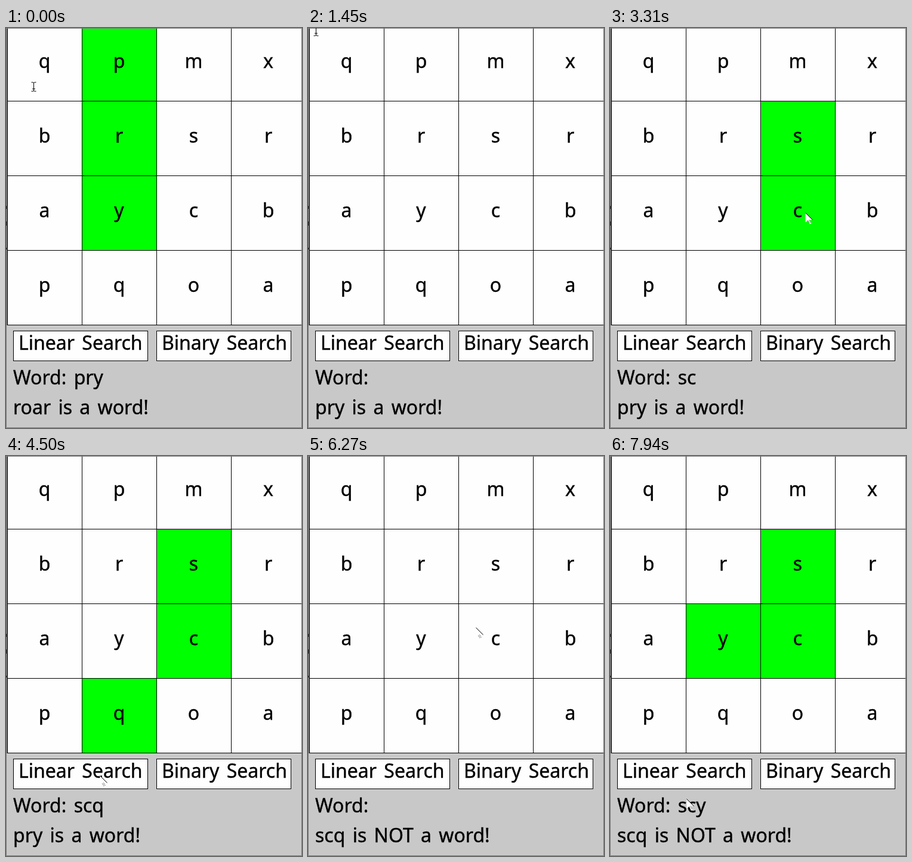
These frames come from a looping animation (496x670 px, 7990 ms). An HTML page:

```html
<!DOCTYPE html>
<html lang="en">
<head>
<meta charset="utf-8">
<title>Word grid search</title>
<style>
  html, body { margin: 0; width: 100%; height: 100%; overflow: hidden; background: #c8c8c8; }
  svg { display: block; }
  text {
    font: 32px "Noto Sans", "Open Sans", sans-serif;
    word-spacing: 4px; white-space: pre; stroke: #000; stroke-width: .4px;
  }
  rect { fill: #fefefe; stroke: #000; }
  .letter { text-anchor: middle; }
  .picked { fill: #0f0; }
  .line { fill: none; stroke: #000; }
  .edge { fill: none; stroke: #777; }
</style>
</head>
<body>
<svg width="496" height="670" viewBox="0 0 496 670">
  <g id="grid"></g>
  <rect x="12.5" y="507.5" width="225" height="50"/>
  <rect x="252.5" y="507.5" width="225" height="50"/>
  <text x="21" y="539">Linear Search</text>
  <text x="261" y="539">Binary Search</text>
  <text id="word" x="12" y="597"></text>
  <text id="status" x="12" y="647"></text>
  <path class="edge" d="M.5.5H495.5V669.5H.5ZM1.5 0V498"/>
  <path class="line" d="M.5 298v5M.5 324v7M.5 368v3"/>
  <g id="beam">
    <path class="line" d="M-4-7.5h3l1 1 1-1h3M-4 7.5h3l1-1 1 1h3M0-7V7M-2.5 3.5h5"/>
  </g>
  <g id="arrow">
    <path d="M0 0V16L4 13 7 19 10 18 7 12H12Z" fill="#fff"/>
    <path class="line" d="M0 0L12 12"/>
    <path class="line" stroke-dasharray="1 1" d="M4 13l3 5M6 12l3 5"/>
  </g>
</svg>
<script>
const LOOP = 7990, MOVE = 410, SIZE = 125;
const LETTERS = "qpmxbrsraycbpqoa";
const DICTIONARY = ["roar", "pry"];
const FIRST_PICK = [1, 5, 9], FIRST_SEARCH = 400;

// Each step moves the arrow, then picks a cell or, without one, runs the search.
const STEPS = [
  { x: 325, y: 181, arrive: 1980, press: 2260, cell: 6 },
  { x: 327, y: 309, arrive: 3100, press: 3200, cell: 10 },
  { x: 199, y: 422, arrive: 3720, press: 3970, cell: 13 },
  { x: 157, y: 535, arrive: 4500, press: 5130 },
  { x: 345, y: 161, arrive: 6430, press: 6620, cell: 6 },
  { x: 330, y: 325, arrive: 7030, press: 7150, cell: 10 },
  { x: 205, y: 335, arrive: 7390, press: 7750, cell: 9 },
  { x: 128, y: 574, arrive: 7940, press: LOOP }
];
const ARROW_START = STEPS[0].arrive - MOVE;

const $ = id => document.getElementById(id);
const clamp = v => Math.min(1, Math.max(0, v));
const ease = u => u * u * (3 - 2 * u);
const spell = cells => cells.map(i => LETTERS[i]).join("");
const judge = word => word + (DICTIONARY.includes(word) ? " is a word!" : " is NOT a word!");

[...LETTERS].forEach((letter, i) => {
  const x = 2.5 + i % 4 * SIZE, y = Math.floor(i / 4) * SIZE - 2.5;
  $("grid").insertAdjacentHTML("beforeend",
    `<rect x="${x}" y="${y}" width="${SIZE}" height="${SIZE}"/>
     <text class="letter" x="${x + 62}" y="${y + 69.5}">${letter}</text>`);
});
const cells = $("grid").querySelectorAll("rect");

function stateAt(t) {
  let picked = FIRST_PICK, checked = "roar";
  const search = () => {
    checked = spell(picked);
    picked = [];
  };
  if (t >= FIRST_SEARCH) search();
  for (const { press, cell } of STEPS) {
    if (t < press) break;
    if (cell === undefined) search();
    else picked = [...picked, cell];
  }
  return { picked, checked };
}

// Sweeps across the top row, rests, then jumps to the corner.
function beamAt(t) {
  if (t >= 1450) return [13, 5];
  const u = clamp(t / 840);
  return [46 + 440 * Math.sin(Math.PI * u), 98 - 56 * u];
}

function arrowAt(t) {
  let x = 13, y = 5, free = 0;
  for (const step of STEPS) {
    const from = Math.max(step.arrive - MOVE, free);
    const k = ease(clamp((t - from) / (step.arrive - from)));
    x += (step.x - x) * k;
    y += (step.y - y) * k;
    free = step.press;
  }
  return [x, y];
}

function draw(t) {
  const { picked, checked } = stateAt(t);
  cells.forEach((cell, i) => cell.classList.toggle("picked", picked.includes(i)));
  $("word").textContent = "Word: " + spell(picked);
  $("status").textContent = judge(checked);

  const isBeam = t < ARROW_START;
  const [x, y] = (isBeam ? beamAt(t) : arrowAt(t)).map(v => Math.round(v) + .5);
  $("beam").style.display = isBeam ? "" : "none";
  $("arrow").style.display = isBeam ? "none" : "";
  $(isBeam ? "beam" : "arrow").setAttribute("transform", `translate(${x} ${y})`);
}

let start;
function tick(now) {
  start ??= now;
  draw((now - start) % LOOP);
  requestAnimationFrame(tick);
}
draw(0);
requestAnimationFrame(tick);
</script>
</body>
</html>
```
